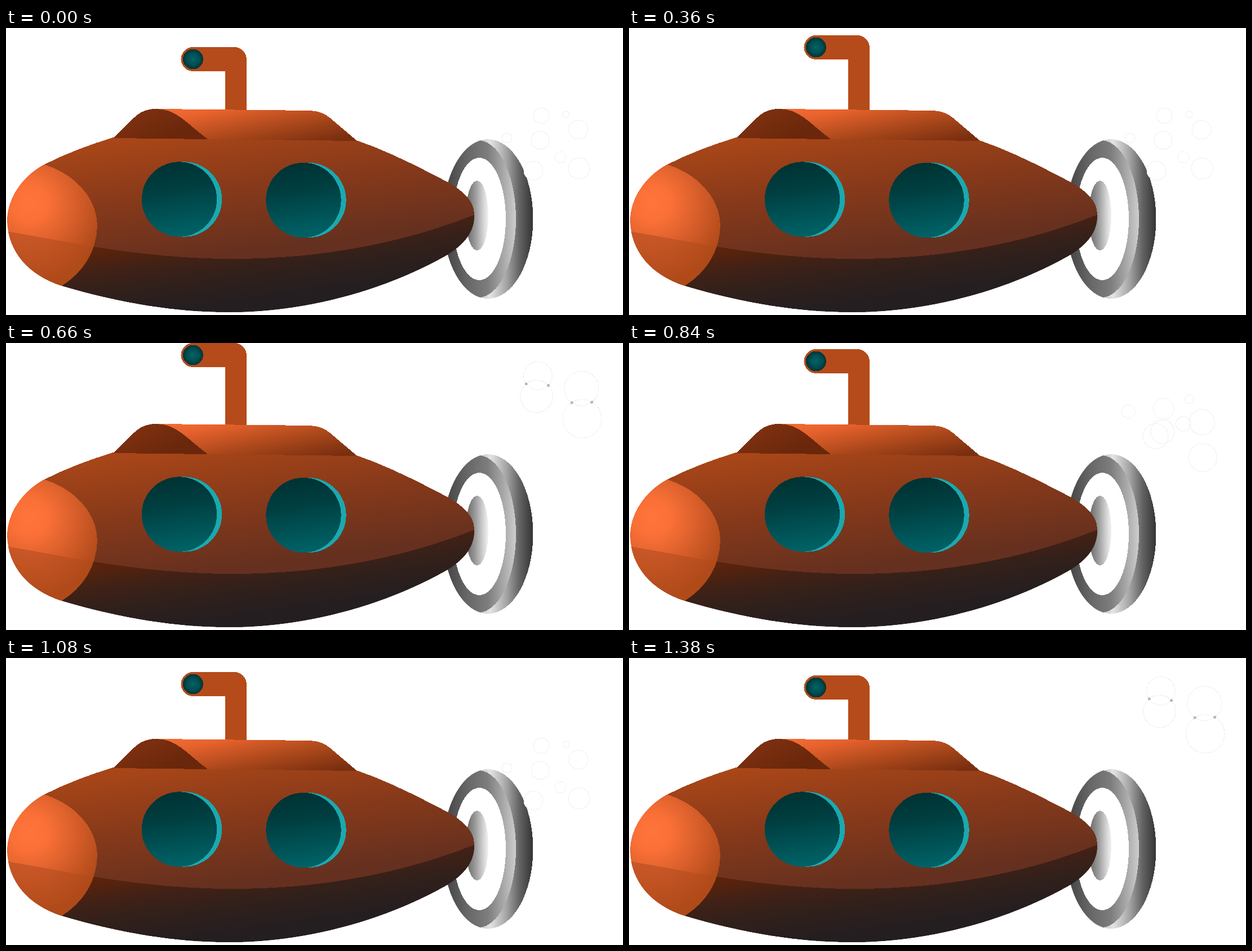
Recreate the animation shown at these times as an HTML page. Size 1095 px wide and 511 px high, loop 1440 ms.

```html
<!DOCTYPE html>
<html lang="en">
<head>
<meta charset="utf-8">
<title>Submarine</title>
<style>
html, body { margin: 0; width: 100%; height: 100%; overflow: hidden; background: #fff; }
svg { display: block; width: 1095px; height: 511px; shape-rendering: crispEdges; }
</style>
</head>
<body>
<svg viewBox="0 0 1095 511">
  <defs>
    <linearGradient id="hull" gradientUnits="userSpaceOnUse" x1="300" y1="186" x2="329" y2="412">
      <stop offset="0" stop-color="#a94618"/><stop offset=".5" stop-color="#86391a"/><stop offset="1" stop-color="#65301f"/>
    </linearGradient>
    <linearGradient id="belly" gradientUnits="userSpaceOnUse" x1="200" y1="392" x2="217" y2="515">
      <stop offset="0" stop-color="#5a230b"/><stop offset=".3" stop-color="#402116"/><stop offset=".6" stop-color="#31201b"/><stop offset="1" stop-color="#241e20"/>
    </linearGradient>
    <radialGradient id="nose" gradientUnits="userSpaceOnUse" cx="42" cy="311" r="132">
      <stop offset="0" stop-color="#ff743a"/><stop offset=".25" stop-color="#fa7037"/><stop offset=".6" stop-color="#d95f2b"/><stop offset="1" stop-color="#b34c1b"/>
    </radialGradient>
    <radialGradient id="chin" gradientUnits="userSpaceOnUse" cx="42" cy="325" r="130">
      <stop offset="0" stop-color="#d15e2c"/><stop offset=".5" stop-color="#c45424"/><stop offset="1" stop-color="#b04a19"/>
    </radialGradient>
    <linearGradient id="cabin" gradientUnits="userSpaceOnUse" x1="400" y1="125" x2="421" y2="231">
      <stop offset="0" stop-color="#f16a34"/><stop offset=".16" stop-color="#e8622d"/><stop offset=".6" stop-color="#ab481b"/><stop offset="1" stop-color="#7a2f10"/>
    </linearGradient>
    <linearGradient id="front" gradientUnits="userSpaceOnUse" x1="250" y1="144" x2="280" y2="200">
      <stop offset="0" stop-color="#7d3010"/><stop offset="1" stop-color="#6a270b"/>
    </linearGradient>
    <linearGradient id="glass" x1=".4" y1="0" x2=".55" y2="1">
      <stop offset="0" stop-color="#003233"/><stop offset=".35" stop-color="#003e40"/><stop offset="1" stop-color="#006367"/>
    </linearGradient>
    <radialGradient id="lens">
      <stop offset="0" stop-color="#006468"/><stop offset=".55" stop-color="#005053"/><stop offset="1" stop-color="#003336"/>
    </radialGradient>
    <linearGradient id="rim" gradientUnits="userSpaceOnUse" x1="840" y1="0" x2="935" y2="0">
      <stop offset="0" stop-color="#c4c4c4"/><stop offset=".2" stop-color="#e4e4e4"/><stop offset=".5" stop-color="#a6a6a6"/><stop offset=".75" stop-color="#636363"/><stop offset="1" stop-color="#343434"/>
    </linearGradient>
    <linearGradient id="ring" gradientUnits="userSpaceOnUse" x1="780" y1="0" x2="905" y2="0">
      <stop offset="0" stop-color="#444"/><stop offset=".3" stop-color="#666"/><stop offset=".6" stop-color="#7d7d7d"/><stop offset=".82" stop-color="#a8a8a8"/><stop offset="1" stop-color="#cdcdcd"/>
    </linearGradient>
    <linearGradient id="hub">
      <stop offset="0" stop-color="#666"/><stop offset=".4" stop-color="#979797"/><stop offset=".8" stop-color="#d6d6d6"/><stop offset="1" stop-color="#f2f2f2"/>
    </linearGradient>
    <path id="body" d="M2 342C3 300 32 262 68 243C105 224 150 207 190 195L622 200C675 218 730 246 783 274C812 290 830 308 831 330C832 353 824 379 783 404C680 463 540 506 395 506C290 506 190 486 99 459C40 440 3 398 2 342Z"/>
    <clipPath id="inside"><use href="#body"/></clipPath>
    <path id="lower" d="M0 362C100 378 215 407 380 411C540 414 700 386 835 331V511H0Z"/>
    <path id="cap" d="M68 243C125 261 162 305 162 352C161 397 137 435 99 459L0 511V200Z"/>
    <clipPath id="capClip"><use href="#cap"/></clipPath>
    <ellipse id="wheel" cx="855.5" cy="340" rx="80" ry="142"/>
    <clipPath id="wheelClip"><use href="#wheel"/></clipPath>
    <g id="window">
      <circle cx="9" r="66.7" fill="#1aa9b0"/>
      <circle r="66.7" fill="url(#glass)"/>
    </g>
  </defs>

  <use href="#wheel" fill="url(#rim)"/>
  <ellipse cx="838" cy="340" rx="67" ry="140" fill="url(#ring)" clip-path="url(#wheelClip)"/>
  <ellipse cx="840" cy="340" rx="47" ry="109" fill="#fff"/>
  <ellipse cx="836" cy="334" rx="20" ry="62" fill="url(#hub)"/>
  <g id="bubbles"></g>

  <g id="scope">
    <path d="M332 0H405A22 22 0 0 1 427 22V160H389V43H332A21.5 21.5 0 0 1 332 0Z" fill="#b54b1a"/>
    <circle cx="332" cy="21.5" r="18" fill="url(#lens)"/>
  </g>

  <use href="#body" fill="url(#hull)"/>
  <g clip-path="url(#inside)">
    <use href="#lower" fill="url(#belly)"/>
    <use href="#cap" fill="url(#nose)"/>
    <use href="#lower" fill="url(#chin)" clip-path="url(#capClip)"/>
  </g>
  <path d="M190 196L228 159Q243 144 266 144L540 147Q561 148 575 160L623 201Z" fill="url(#cabin)"/>
  <path d="M190 196L228 159Q243 144 266 144C303 144 318 168 358 198Z" fill="url(#front)"/>
  <use href="#window" x="307.5" y="305"/>
  <use href="#window" x="528" y="306.5"/>
</svg>

<script>
const STEP = 60, LOOP = 1440, CYCLE = 6;
const CENTER = 985, SURFACE = 50;

// Start x, y, radius and rise per step
const bubbles = [
  [1017, 250, 19, 23], [1016, 181, 17, 20], [948, 200, 16, 21], [936, 254, 17, 44],
  [950, 156, 14, 19.5], [994, 154, 6, 27], [984, 230, 10, 43], [889, 196, 9, 37]
];

const scope = document.getElementById('scope');
const layer = document.getElementById('bubbles');
const clamp01 = v => Math.min(1, Math.max(0, v));

function add(parent, tag, attrs = {}) {
  const el = document.createElementNS('http://www.w3.org/2000/svg', tag);
  for (const k in attrs) el.setAttribute(k, attrs[k]);
  return parent.appendChild(el);
}

// Bubbles rise, swell and spread until they reach the surface
function bubblesAt(n) {
  return bubbles
    .map(([x, y, r, rise]) => ({
      x: x + (x - CENTER) * .007 * n * n,
      y: y - rise * n,
      r: r * (1 + .16 * n)
    }))
    .filter(b => b.y > SURFACE);
}

function crossings(a, b) {
  const dx = b.x - a.x, dy = b.y - a.y, d = Math.hypot(dx, dy);
  const along = (d * d + a.r * a.r - b.r * b.r) / (2 * d);
  const h2 = a.r * a.r - along * along;
  if (h2 <= 0) return [];
  return [1, -1].map(side => {
    const h = side * Math.sqrt(h2);
    return [a.x + (along * dx - h * dy) / d, a.y + (along * dy + h * dx) / d];
  });
}

function buildStep(n) {
  const g = add(layer, 'g'), list = bubblesAt(n), late = n > 2;
  const dot = (x, y, size, fill) => add(g, 'circle', { cx: x, cy: y, r: size, fill });
  for (const { x, y, r } of list) {
    add(g, 'circle', {
      cx: x, cy: y, r,
      fill: n ? 'none' : '#fff',
      stroke: late ? '#e2e2e2' : '#f0f0f0',
      'stroke-dasharray': late ? '2 2' : 'none'
    });
    if (late && n < CYCLE - 1 && r > 20) dot(x - r * .5, y - r * .42, 1.5, '#d0d0d0');
  }
  if (n === CYCLE - 1)
    list.forEach((a, i) => list.slice(i + 1).forEach(b =>
      crossings(a, b).forEach(([x, y]) => dot(x, y, 2.5, '#b8b8b8'))));
  return g;
}

const steps = Array.from({ length: CYCLE }, (_, n) => buildStep(n));

// Rises to the top edge, waits, then sinks back
function scopeTop(t) {
  return Math.ceil(t < 600 ? 34 * (1 - clamp01((t - 45) / 510)) : 31 * clamp01((t - 660) / 540));
}

const start = performance.now();
function draw(now) {
  const step = Math.floor(Math.max(0, now - start) % LOOP / STEP);
  scope.setAttribute('transform', `translate(0 ${scopeTop(step * STEP)})`);
  steps.forEach((g, n) => g.setAttribute('visibility', n === step % CYCLE ? 'visible' : 'hidden'));
  requestAnimationFrame(draw);
}
draw(start);
</script>
</body>
</html>
```
